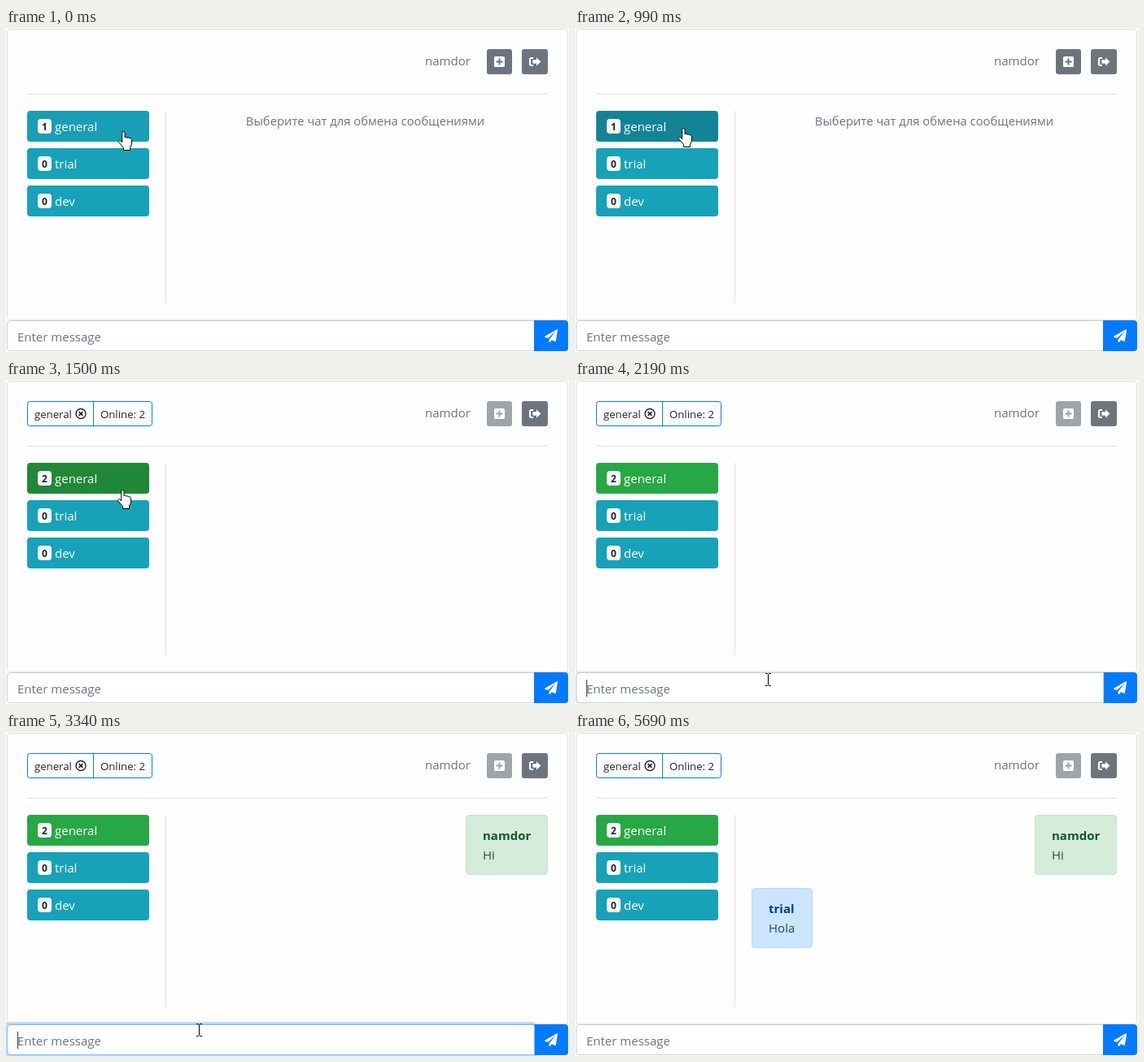
Write an HTML page that moves like this. It is 692x399 px and loops after 8 s.

```html
<!DOCTYPE html>
<html lang="ru">
<head>
<meta charset="utf-8">
<title>Chat</title>
<style>
  html, body { margin: 0; width: 100%; height: 100%; overflow: hidden; background: #fefefe; }
  svg { display: block; width: 692px; height: 399px; font: 15px "Open Sans", "Noto Sans", sans-serif; }
  .small { font-size: 13.2px; fill: #212529; }
  .muted { fill: #6c757d; }
  .badge { font-size: 12px; font-weight: 700; fill: #212529; text-anchor: middle; }
  .bold { font-weight: 700; }
</style>
</head>
<body>
<svg viewBox="0 0 692 399">
  <defs>
    <path id="field" d="M649.5 360.5H5a3.5 3.5 0 0 0-3.5 3.5v30a3.5 3.5 0 0 0 3.5 3.5h644.5z"/>
  </defs>

  <!-- card -->
  <rect x="1.5" y="1.5" width="689" height="358" rx="3.5" fill="#fefefe" stroke="#dfdfdf"/>
  <path d="M26 81.5H666" stroke="#e2e2e2"/>
  <path d="M196.5 102V339" stroke="#dee2e6"/>

  <!-- header -->
  <text class="muted" x="515" y="46">namdor</text>
  <g id="plus">
    <rect x="591" y="26" width="31" height="31" rx="3.2" fill="#6c757d"/>
    <rect x="600" y="35" width="13" height="13" rx="1.6" fill="#fff"/>
    <path d="M602.5 41.5h8M606.5 37.5v8" stroke="#6c757d" stroke-width="2"/>
  </g>
  <rect x="634" y="26" width="32" height="31" rx="3.2" fill="#6c757d"/>
  <path d="M648 37h-2.6a1.4 1.4 0 0 0-1.4 1.4v6.2a1.4 1.4 0 0 0 1.4 1.4h2.6" fill="none" stroke="#fff" stroke-width="2"/>
  <path d="M657.4 41.5l-5.4-5.2v3h-4.6v4.4h4.6v3z" fill="#fff"/>
  <g id="chip">
    <rect x="26.5" y="26.5" width="153" height="30" rx="3" fill="#fefefe" stroke="#007bff"/>
    <path d="M107.5 26v31" stroke="#007bff"/>
    <text class="small" x="35" y="47">general</text>
    <circle cx="92" cy="41.5" r="6" fill="none" stroke="#212529" stroke-width="1.4"/>
    <path d="M89.6 39.1l4.8 4.8M94.4 39.1l-4.8 4.8" stroke="#212529" stroke-width="1.7"/>
    <text class="small" x="116" y="47">Online: 2</text>
  </g>

  <g id="rooms"></g>
  <text id="hint" class="muted" x="441.5" y="120" font-size="14.8" text-anchor="middle">Выберите чат для обмена сообщениями</text>
  <g id="mine"></g>
  <g id="reply"></g>

  <!-- message field -->
  <use href="#field" fill="#fff" stroke="#ced4da"/>
  <path d="M649 360h38a4 4 0 0 1 4 4v30a4 4 0 0 1-4 4h-38z" fill="#007bff"/>
  <path transform="translate(662 371)" fill="#fff"
    d="M15 .2L.5 8.5a.8.8 0 0 0 0 1.3l3.3 1.4 9-7.9.2.2-7.5 9.2v2.6a.8.8 0 0 0 1.4.4l1.9-2.4L12.7 15a.8.8 0 0 0 1.1-.6L16 1a.8.8 0 0 0-1-.8z"/>
  <g id="active" fill="none">
    <use href="#field" stroke="#ced4da"/>
    <g id="ring">
      <use href="#field" stroke="#80bdff"/>
      <rect x="-.5" y="358.5" width="652" height="41" rx="5" stroke="#007bff" stroke-opacity=".25" stroke-width="3"/>
    </g>
  </g>
  <text id="entry" x="14" y="386"></text>
  <path id="caret" d="M.5 369v21" stroke="#343a40"/>

  <!-- pointers -->
  <path id="hand" fill="#fff" stroke="#000" stroke-linejoin="round"
    d="M4.7 14V2.3a1.7 1.7 0 0 1 3.4 0V8a1.6 1.6 0 0 1 3 .5 1.6 1.6 0 0 1 2.8.7 1.5 1.5 0 0 1 2.6 1.2V16l-2 4.3v3.2H6.6v-2.8L1 14.2c-1.3-2 .9-3.6 2.4-2z"/>
  <path id="arrow" fill="#fff" stroke="#000" d="M.5 1.2v15l3.5-3.4 2.3 5.4 2.3-1-2.3-5.2h4.9z"/>
  <path id="beam" fill="none" stroke="#000" d="M0 .5h2.5l1 1 1-1h2.5M3.5 1.5v13M0 15.5h2.5l1-1 1 1h2.5"/>
</svg>

<script>
const LOOP = 8000;
const $ = id => document.getElementById(id);
const show = (id, on) => { $(id).style.display = on ? '' : 'none'; };

const room = (name, count, y) => `
  <rect x="26" y="${y}" width="150" height="38" rx="4" fill="#17a2b8"/>
  <rect x="39" y="${y + 10}" width="17" height="18" rx="4" fill="#f8f9fa"/>
  <text class="badge" x="47.5" y="${y + 24}">${count}</text>
  <text x="60" y="${y + 25}" fill="#fff">${name}</text>`;

const message = (x, y, w, name, text, [fill, line, title, ink]) => `
  <rect x="${x + .5}" y="${y + .5}" width="${w - 1}" height="73" rx="3.5" fill="${fill}" stroke="${line}"/>
  <text class="bold" x="${x + 21}" y="${y + 31}" fill="${title}">${name}</text>
  <text x="${x + 21}" y="${y + 55}" fill="${ink}">${text}</text>`;

$('rooms').innerHTML = room('general', 1, 102) + room('trial', 0, 148) + room('dev', 0, 194);
$('mine').innerHTML = message(565, 102, 101, 'namdor', 'Hi', ['#d4edda', '#c3e6cb', '#155724', '#24503a']);
$('reply').innerHTML = message(217, 192, 75, 'trial', 'Hola', ['#cce5ff', '#b8daff', '#004085', '#24425f']);
const roomBox = $('rooms').querySelector('rect');
const roomCount = $('rooms').querySelector('.badge');

// Each step changes part of the state from its time on.
const steps = [
  [0, { color: '#189fb5', count: 1, joined: false, pointer: ['hand', 138, 127],
        focus: 0, typed: '', caret: null, mine: false, reply: false }],
  [120, { color: '#138496', pointer: null }],
  [680, { pointer: ['hand', 142, 138] }],
  [990, { pointer: ['hand', 127, 123] }],
  [1110, { color: '#1a8667', joined: true }],
  [1230, { color: '#218838' }],
  [1380, { count: 2, pointer: ['hand', 131, 128] }],
  [1500, { pointer: ['hand', 137, 135] }],
  [1650, { color: '#25983f', pointer: ['arrow', 180, 195] }],
  [1770, { color: '#28a745', pointer: ['arrow', 228, 258] }],
  [1920, { pointer: ['arrow', 237, 327] }],
  [2070, { pointer: ['beam', 234, 362] }],
  [2190, { pointer: ['beam', 234, 361], focus: .12, caret: 14 }],
  [2310, { focus: .9 }],
  [2430, { focus: 1, pointer: ['beam', 234, 360] }],
  [2550, { pointer: ['beam', 234, 359] }],
  [2700, { caret: null }],
  [2960, { typed: 'H', caret: 25 }],
  [3080, { typed: 'Hi', caret: 29 }],
  [3340, { typed: '', caret: 14, mine: true }],
  [3730, { pointer: null }],
  [3860, { caret: null }],
  [4420, { focus: .4 }],
  [4540, { focus: 0 }],
  [5690, { reply: true }]
];

function stateAt(t) {
  const state = {};
  for (const [start, change] of steps) if (start <= t) Object.assign(state, change);
  return state;
}

function draw(s) {
  roomBox.setAttribute('fill', s.color);
  roomCount.textContent = s.count;
  show('chip', s.joined);
  show('hint', !s.joined);
  $('plus').setAttribute('opacity', s.joined ? .65 : 1);
  show('mine', s.mine);
  show('reply', s.reply);

  show('active', s.focus > 0);
  $('ring').setAttribute('opacity', s.focus);
  $('entry').textContent = s.typed || 'Enter message';
  $('entry').setAttribute('fill', s.typed ? '#495057' : '#6c757d');
  show('caret', s.caret !== null);
  $('caret').setAttribute('transform', `translate(${s.caret || 0} 0)`);

  const [kind, x, y] = s.pointer || [];
  for (const id of ['hand', 'arrow', 'beam']) show(id, id === kind);
  if (kind) $(kind).setAttribute('transform', `translate(${x} ${y})`);
}

const origin = performance.now();
function tick() {
  draw(stateAt(Math.max(0, performance.now() - origin) % LOOP));
  requestAnimationFrame(tick);
}
tick();
</script>
</body>
</html>
```
